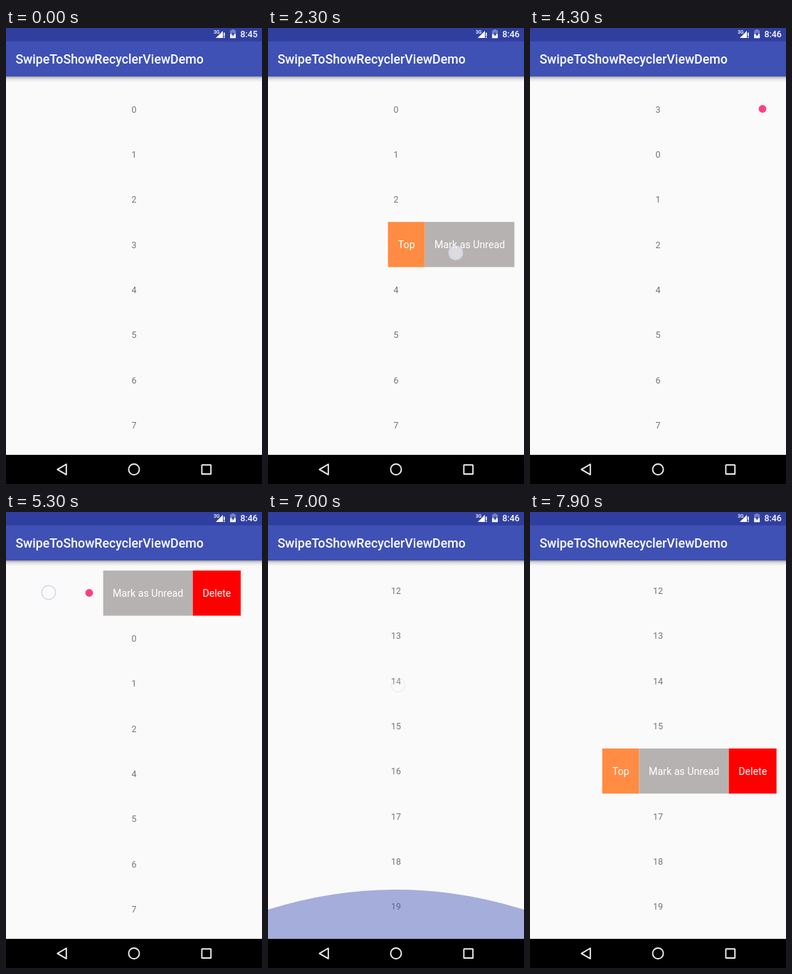
An HTML page that plays this animation: 360x640 px, repeating every 8 s.

```html
<!DOCTYPE html>
<html lang="en">
<head>
<meta charset="utf-8">
<title>Swipe list</title>
<style>
  html, body { margin: 0; width: 100%; height: 100%; overflow: hidden; background: #fafafa; }
  svg { display: block; width: 360px; height: 640px; font-family: Roboto, sans-serif; }
  .number { font-size: 12.45px; fill: #757575; text-anchor: middle; }
  .button { font-size: 14.2px; fill: #fff; text-anchor: middle; }
</style>
</head>
<body>
<svg viewBox="0 0 360 640">
  <defs>
    <clipPath id="listClip"><rect x="13.3" y="68" width="333.4" height="531"/></clipPath>
    <linearGradient id="shade" x2="0" y2="1">
      <stop offset="0" stop-color="#000" stop-opacity=".36"/>
      <stop offset=".4" stop-color="#000" stop-opacity=".11"/>
      <stop offset="1" stop-color="#000" stop-opacity="0"/>
    </linearGradient>
  </defs>
  <rect width="360" height="640" fill="#fafafa"/>
  <g id="list" clip-path="url(#listClip)"></g>
  <path id="glow" fill="#3f51b5"/>

  <rect y="68" width="360" height="8" fill="url(#shade)"/>
  <rect y="18" width="360" height="50" fill="#3f51b5"/>
  <rect width="360" height="18.7" fill="#303f9f"/>
  <g fill="#fff" font-weight="500">
    <text x="13.4" y="50.2" font-size="17.75">SwipeToShowRecyclerViewDemo</text>
    <text id="clock" x="353.8" y="13" font-size="12.4" text-anchor="end"></text>
    <text x="292" y="7.6" font-size="6.8">3G</text>
    <path d="M295 14L305 4V14Z M306 6.5h1.7v5h-1.7z M306 12.4h1.7V14h-1.7z"/>
    <path d="M317.5 2h3.4v1.3h2.2V14.2h-7.9V3.3h2.3z" opacity=".35"/>
    <path d="M315.2 8.5h7.9v5.7h-7.9z"/>
    <path d="M319.8 5L317 9.6h1.7v3L321.4 8h-1.6z" fill="#303f9f"/>
  </g>

  <rect y="599.1" width="360" height="41"/>
  <g fill="none" stroke="#ececec" stroke-width="1.9" stroke-linejoin="round">
    <path d="M72.3 619.6L84.8 612.3V626.9Z"/>
    <circle cx="180" cy="619.5" r="7.5"/>
    <rect x="275.4" y="613.2" width="12.8" height="12.8" rx=".6"/>
  </g>
  <circle id="finger" r="9.8" fill="#fafafa" fill-opacity=".6" stroke="#d3d5ee" stroke-width="1.4"/>
</svg>
<script>
const LOOP = 8000, STEP = 100;
const ROW = 190 / 3, LIST_TOP = 82.2, RIGHT = 346.7, COUNT = 20, MAX_SCROLL = 700.3;
const BUTTONS = {
  'Top': [52, '#ff8c42'],
  'Mark as Unread': [126, '#b7b2b2'],
  'Delete': [67.4, '#ff0000']
};

// A drag pulls the row out to `pull`, then the row springs to its menu's width until `close`.
const swipes = [
  { item: 3, labels: ['Top', 'Mark as Unread'], start: 800, end: 1100, pull: 235, x: 3, y: 341, close: 2500 },
  { item: 3, labels: ['Top', 'Mark as Unread'], start: 2900, end: 3100, pull: 182, x: 29, y: 329, close: 4100 },
  { item: 3, labels: ['Mark as Unread', 'Delete'], start: 5000, end: 5300, pull: 210, x: 60, y: 113, close: 6000 },
  { item: 16, labels: ['Top', 'Mark as Unread', 'Delete'], start: 7200, end: 7600, pull: 230, x: 60, y: 363, close: LOOP }
];
const tap = (start, x, y) => ({ start, end: start + 100, x, y, dx: 0, dy: 0 });
const touches = [
  ...swipes.map(s => ({ ...s, dx: -s.pull, dy: 0 })),
  tap(2300, 264, 315.5),
  tap(3900, 195, 309),
  tap(6000, 310, 110.5),
  { start: 6250, end: 6400, x: 160, y: 390, dx: -15, dy: -130 },
  { start: 6750, end: 6900, x: 183, y: 243, dx: 10, dy: -130 }
];

const ramp = (t, from, to) => Math.min(1, Math.max(0, (t - from) / (to - from)));
const smooth = p => (1 - Math.cos(Math.PI * p)) / 2;

function set(node, attrs) {
  for (const name in attrs) node.setAttribute(name, attrs[name]);
  return node;
}

function add(parent, tag, attrs, text = '') {
  const node = set(document.createElementNS('http://www.w3.org/2000/svg', tag), attrs);
  node.textContent = text;
  return parent.appendChild(node);
}

const $ = id => document.getElementById(id);
const list = $('list'), finger = $('finger'), glow = $('glow'), clock = $('clock');

const rows = Array.from({ length: COUNT }, (_, i) => {
  const group = add(list, 'g', {});
  add(group, 'text', { class: 'number', x: 180, y: 36.4 }, i);
  return group;
});
const dot = add(rows[3], 'circle', { cx: 327, cy: 31.3, r: 5.4, fill: '#ff4081' });

for (const swipe of swipes) {
  swipe.menu = add(list, 'g', {});
  swipe.width = 0;
  for (const label of swipe.labels) {
    const [width, fill] = BUTTONS[label], x = swipe.width;
    add(swipe.menu, 'rect', { x, width, height: ROW, fill });
    add(swipe.menu, 'text', { class: 'button', x: x + width / 2, y: 37 }, label);
    swipe.width += width;
  }
}

function swipeOffset({ start, end, pull, width, close }, t) {
  if (t <= start || t >= close) return 0;
  if (t <= end) return pull * ramp(t, start, end);
  return width + (pull - width) * Math.exp((end - t) / 75);
}

function slot(i, t) {
  const moved = smooth(ramp(t, 4000, 4300)), removed = smooth(ramp(t, 6000, 6300));
  if (i === 3) return 3 - 3 * moved;
  if (i < 3) return i + moved - (i > 0 ? removed : 0);
  return i - removed;
}

function drawList(t) {
  const scroll = MAX_SCROLL * smooth(ramp(t, 6200, 6800));
  const top = i => LIST_TOP + slot(i, t) * ROW - scroll;
  const offsets = Array(COUNT).fill(0);

  for (const swipe of swipes) {
    const offset = swipeOffset(swipe, t);
    offsets[swipe.item] += offset;
    set(swipe.menu, {
      transform: `translate(${RIGHT - offset} ${top(swipe.item)})`,
      visibility: offset ? 'visible' : 'hidden'
    });
  }
  rows.forEach((row, i) => set(row, { transform: `translate(${-offsets[i]} ${top(i)})` }));
  set(rows[0], { opacity: 1 - ramp(t, 5900, 6004) });
  set(dot, { visibility: t >= 2500 ? 'visible' : 'hidden' });
}

function drawFinger(t) {
  const touch = touches.find(({ start, end, dx }) => (dx ? t > start : t >= start) && t <= end + STEP);
  if (!touch) return set(finger, { opacity: 0 });
  const { start, end, x, y, dx, dy } = touch, left = 1 - ramp(t, start, end);
  set(finger, { cx: x - dx * left, cy: y - dy * left, opacity: t <= end ? .95 : .3 });
}

function drawGlow(t) {
  const rise = 1 - (1 - ramp(t, 6700, 7000)) ** 2;
  const strength = rise * smooth(1 - ramp(t, 7000, 7700));
  const height = 69 * strength, edge = 599 - height * .594;
  set(glow, {
    d: `M0 599V${edge}Q180 ${599 - height * 1.406} 360 ${edge}V599Z`,
    opacity: .46 * strength
  });
}

const start = performance.now();
function tick() {
  const elapsed = (performance.now() - start) % LOOP;
  const t = Math.floor(elapsed / STEP) * STEP;
  drawList(t);
  drawFinger(t);
  drawGlow(t);
  clock.textContent = t < 100 ? '8:45' : '8:46';
  requestAnimationFrame(tick);
}
tick();
</script>
</body>
</html>
```
